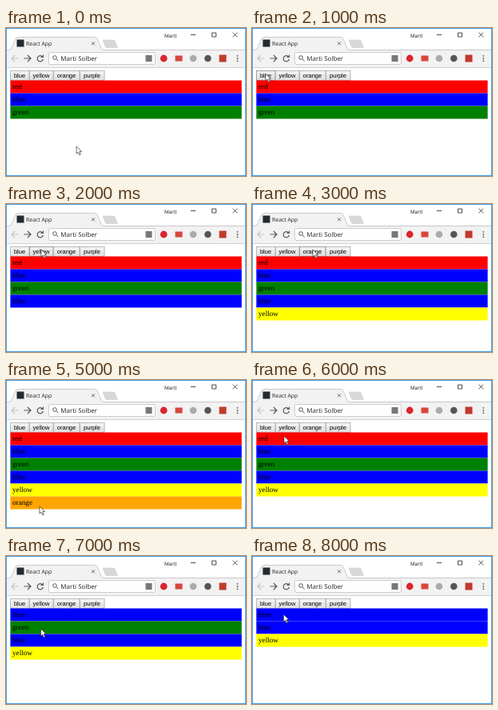
An HTML page for the animation above (9 s loop, 300 by 185 pixels).

```html
<!DOCTYPE html>
<html lang="en">
<head>
<meta charset="utf-8">
<title>Color list</title>
<style>
  html, body { margin: 0; width: 100%; height: 100%; overflow: hidden; background: #fff; }
  svg { display: block; width: 100%; height: 100%; }
  text { text-rendering: geometricPrecision; }
  .ui { font-family: "Open Sans", "Noto Sans", sans-serif; }
  .button { font: 7.5px "Liberation Sans", Arial, sans-serif; }
  .row { font: 9.2px "Liberation Serif", "Times New Roman", serif; }
  .line { fill: none; stroke: #555; stroke-width: 1.2; }
</style>
</head>
<body>
<svg viewBox="0 0 300 185">
  <defs>
    <linearGradient id="face" x2="0" y2="1">
      <stop stop-color="#f6f6f6"/><stop offset="1" stop-color="#dfdfdf"/>
    </linearGradient>
    <linearGradient id="hover" x2="0" y2="1">
      <stop stop-color="#f4f4f4"/><stop offset="1" stop-color="#dadada"/>
    </linearGradient>
  </defs>
  <rect width="300" height="185" fill="#fff"/>

  <!-- Tab strip -->
  <path d="M121 15h13.5q1 0 1.5 1l3.5 8.5h-13.5q-1.2 0-1.7-1z" fill="#d8d8d8" stroke="#c8c8c8" stroke-width=".5"/>
  <rect x="1" y="27" width="298" height="22" fill="#f2f2f2"/>
  <path d="M1 27.5H4Q6 27.5 7 25L12 13.5Q13 11.5 15 11.5H111Q113 11.5 114 13.5L119 25Q120 27.5 122 27.5H299" fill="#f2f2f2" stroke="#bdbdbd" stroke-width=".8"/>
  <rect x="13.5" y="14.5" width="9" height="9" fill="#23292d"/>
  <text class="ui" x="25" y="22" font-size="6.9" fill="#222">React App</text>
  <path class="line" d="M107 17.3l4 4m0-4l-4 4" style="stroke-width:.9"/>
  <text class="ui" x="198" y="11.5" font-size="6.2" fill="#777" stroke="#aaa" stroke-width=".5" paint-order="stroke">Marti</text>
  <path d="M231 8.5h6M257.5 6h5v5h-5zM283.5 5.7l5.6 5.6m0-5.6l-5.6 5.6" fill="none" stroke="#222" stroke-width=".8"/>

  <!-- Toolbar -->
  <path d="M1 49.5h298" stroke="#c8c8c8" stroke-width=".8"/>
  <path class="line" d="M15.5 38H7m4-4l-4 4 4 4" style="stroke:#c4c4c4"/>
  <path class="line" d="M22.5 38h8.5m-4-4l4 4-4 4"/>
  <path class="line" d="M45.5 35.8a3.6 3.6 0 1 0 .8 3.2M46.5 33.4v3.1h-3.1"/>
  <rect x="53.5" y="30.5" width="133" height="15" rx="1.5" fill="#fff" stroke="#c2c2c2" stroke-width=".8"/>
  <circle class="line" cx="61" cy="37" r="2.3" style="stroke-width:1"/>
  <path class="line" d="M62.8 38.8l2.7 2.7" style="stroke-width:1"/>
  <text class="ui" x="68.3" y="40.8" font-size="8" fill="#222">Marti Solber</text>
  <rect x="174.5" y="34" width="8" height="8" fill="#777"/>
  <circle cx="197.2" cy="38" r="4.4" fill="#d9262b"/>
  <rect x="211.5" y="34.5" width="9" height="7" fill="#d8453b"/>
  <circle cx="234" cy="38" r="4.3" fill="#aaa"/>
  <circle cx="252.3" cy="38" r="4.3" fill="#555"/>
  <rect x="266.5" y="33.5" width="9" height="9" fill="#c23a2d"/>
  <g fill="#555"><circle cx="289.3" cy="34.8" r=".9"/><circle cx="289.3" cy="38" r=".9"/><circle cx="289.3" cy="41.2" r=".9"/></g>

  <g id="buttons"></g>
  <g id="rows"></g>
  <path id="cursor" d="M0 0V9.2L2.1 7.2 3.7 10.8 5.3 10.1 3.7 6.6H6.6Z" fill="#fff" stroke="#222" stroke-width=".65"/>
  <rect x=".5" y=".5" width="299" height="184" fill="none" stroke="#3f9bea"/>
</svg>
<script>
  const STEP = 1000;
  const fills = { red: '#f00', blue: '#00f', green: '#008000', yellow: '#ff0', orange: '#ffa500' };
  const initial = ['red', 'blue', 'green'];
  const full = [...initial, 'blue', 'yellow', 'orange'];

  // Each step: cursor position, visible rows, hovered button
  const steps = [
    { at: [88, 148], rows: initial },
    { at: [17, 57], rows: initial, hover: 'blue' },
    { at: [44, 57], rows: full.slice(0, 4), hover: 'yellow' },
    { at: [76, 57], rows: full.slice(0, 5), hover: 'orange' },
    { at: [103, 56], rows: full, hover: 'purple' },
    { at: [42, 158], rows: full },
    { at: [40, 70], rows: full.slice(0, 5) },
    { at: [43.5, 91], rows: full.slice(1, 5) },
    { at: [39.5, 73], rows: ['blue', 'blue', 'yellow'] }
  ];

  const byId = id => document.getElementById(id);

  function add(parent, tag, attrs, text = '') {
    const node = document.createElementNS('http://www.w3.org/2000/svg', tag);
    for (const key in attrs) node.setAttribute(key, attrs[key]);
    node.textContent = text;
    return parent.appendChild(node);
  }

  const buttons = [['blue', 5, 24], ['yellow', 29, 30], ['orange', 59, 33], ['purple', 92, 31]]
    .map(([name, x, width]) => {
      const face = add(byId('buttons'), 'rect', { x: x + .5, y: 53.5, width: width - .5, height: 12, 'stroke-width': .8 });
      add(byId('buttons'), 'text', { class: 'button', x: x + width / 2, y: 62, 'text-anchor': 'middle' }, name);
      return { name, face };
    });

  function show({ at, rows, hover }) {
    const list = byId('rows');
    list.replaceChildren();
    rows.forEach((name, i) => {
      const y = 65.5 + 16 * i;
      add(list, 'rect', { x: 5.4, y, width: 289.2, height: 16, fill: fills[name] });
      add(list, 'text', { class: 'row', x: 8, y: y + 10.9 }, name);
    });
    for (const { name, face } of buttons) {
      const active = name === hover;
      face.setAttribute('fill', active ? 'url(#hover)' : 'url(#face)');
      face.setAttribute('stroke', active ? '#8a8a8a' : '#aaa');
    }
    byId('cursor').setAttribute('transform', `translate(${at})`);
  }

  let shown = -1;
  const start = performance.now();

  function tick() {
    const index = Math.floor((performance.now() - start) / STEP) % steps.length;
    if (index !== shown) show(steps[shown = index]);
    requestAnimationFrame(tick);
  }
  tick();
</script>
</body>
</html>
```
